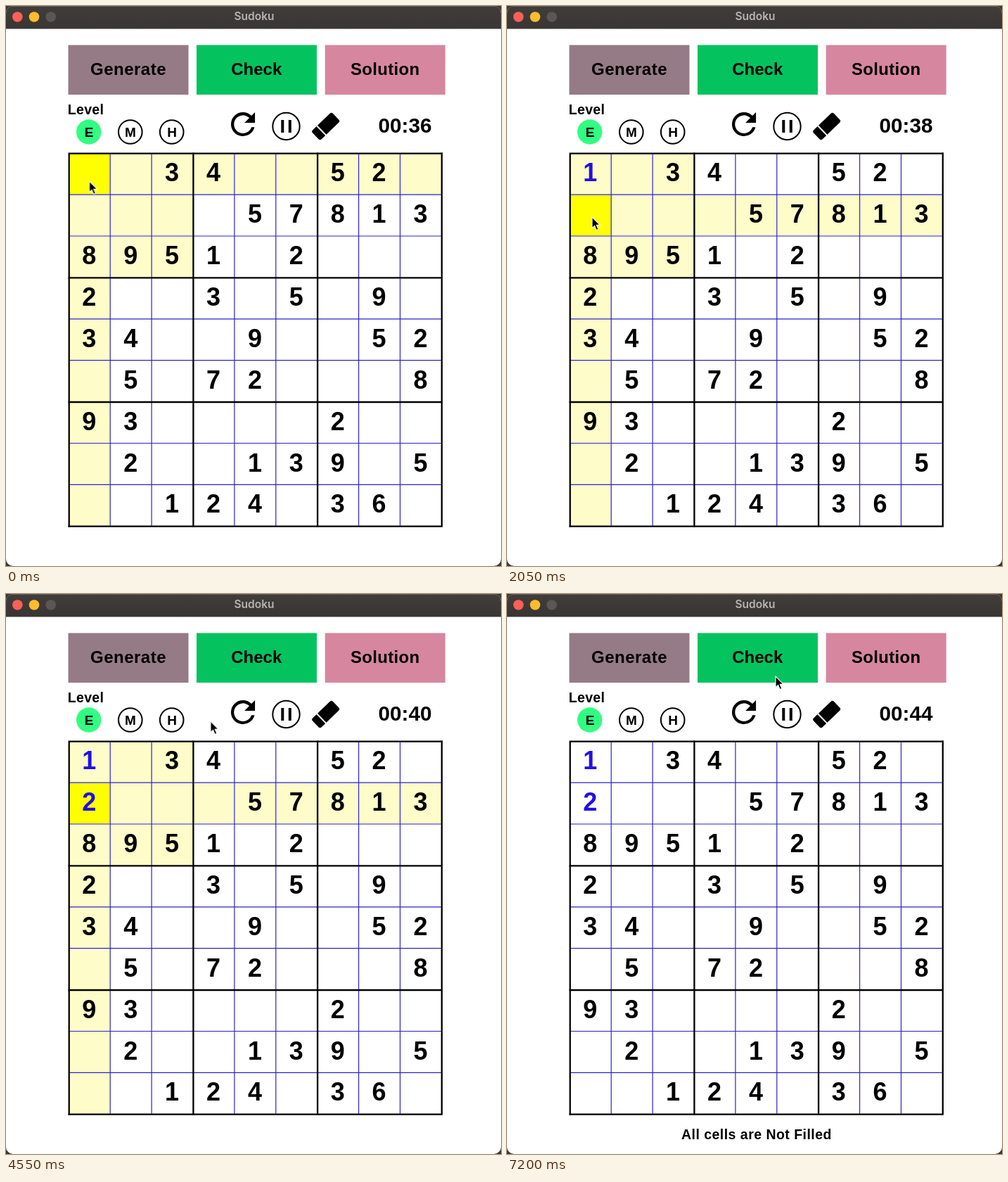
An HTML page for the animation above (8000 ms loop, 704x796 px).

```html
<!DOCTYPE html>
<html lang="en">
<head>
<meta charset="utf-8">
<title>Sudoku</title>
<style>
  html, body { margin: 0; width: 100%; height: 100%; overflow: hidden; background: #3b372f; }
  svg { display: block; width: 704px; height: 796px; }
  text { font-family: "Liberation Sans", Arial, sans-serif; font-weight: 700; white-space: pre; }
  .mid { text-anchor: middle; }
  .title { font: 600 15.5px Inter, sans-serif; fill: #b7b5b3; }
  .digit { font-size: 36px; }
  .typed { fill: #2310e2; }
  .level { font-size: 19px; }
  .thin { stroke: #2d22c4; stroke-width: 1.2; }
  .thick { stroke: #000; stroke-width: 2.3; stroke-linecap: square; }
  #cursor { animation: move 8s infinite; }
  @keyframes move {
    0%, 8.75% { transform: translate(118.5px, 249px); animation-timing-function: ease-in-out; }
    11.25% { transform: translate(122px, 298px); animation-timing-function: ease-out; }
    15%, 50.625% { transform: translate(121px, 300px); animation-timing-function: ease-in-out; }
    61.25%, 100% { transform: translate(382px, 117px); }
  }
</style>
</head>
<body>
<svg viewBox="0 0 704 796">
  <defs>
    <linearGradient id="bar" x2="0" y2="1">
      <stop offset="0" stop-color="#403d3b"/><stop offset="1" stop-color="#383533"/>
    </linearGradient>
    <clipPath id="win"><rect width="704" height="796" rx="10"/></clipPath>
  </defs>
  <g clip-path="url(#win)">
    <rect width="704" height="796" fill="#fff"/>
    <rect width="704" height="32.5" fill="url(#bar)"/>
    <rect width="704" height="1" fill="#625f5d"/>
  </g>
  <circle cx="16.3" cy="15.5" r="7.3" fill="#fe5f57"/>
  <circle cx="40" cy="15.5" r="7.3" fill="#febc2e"/>
  <circle cx="63.7" cy="15.5" r="7.3" fill="#5a5755"/>
  <text class="title mid" x="353" y="20.3">Sudoku</text>

  <rect x="88.5" y="55.5" width="171" height="70.5" fill="#957b85"/>
  <rect x="271" y="55.5" width="171" height="70.5" fill="#04c35f"/>
  <rect x="453.7" y="55.5" width="171" height="70.5" fill="#d6879f"/>
  <g font-size="24">
    <text x="120" y="98" letter-spacing=".5">Generate</text>
    <text x="320.2" y="98">Check</text>
    <text x="490" y="98" letter-spacing=".3">Solution</text>
  </g>

  <text x="87.8" y="154" font-size="19.5" letter-spacing=".3">Level</text>
  <circle cx="117.7" cy="179" r="17.7" fill="#32fd82"/>
  <g fill="none" stroke="#000" stroke-width="2">
    <circle cx="176.8" cy="179" r="16.8"/>
    <circle cx="235.7" cy="179" r="16.8"/>
    <circle cx="398.5" cy="171" r="19.2"/>
  </g>
  <text class="level mid" x="118" y="186">E</text>
  <text class="level mid" x="177" y="186">M</text>
  <text class="level mid" x="236" y="186">H</text>

  <path transform="translate(311.5 142.5) scale(2.13)" d="M17.65 6.35C16.2 4.9 14.21 4 12 4a8 8 0 1 0 7.73 10h-2.08A6 6 0 1 1 16.22 7.78L13 11h7V4z"/>
  <path d="M391.3 162h4v18h-4zM401.8 162h4v18h-4z"/>
  <g transform="translate(454.7 171) rotate(-44)">
    <rect x="-20" y="-9" width="40" height="18" rx="3"/>
    <path d="M-8.5 -10V10" stroke="#fff" stroke-width="2"/>
  </g>
  <text id="clock" x="529.6" y="179.6" font-size="29.7"></text>

  <g id="shade"></g>
  <g id="lines"></g>
  <g id="digits"></g>
  <text id="note" x="248" y="774.7" font-size="19.5" letter-spacing=".47">All cells are Not Filled</text>

  <g id="cursor">
    <path d="M0 0V15.6L3.6 12.4L6.2 18.6L8.9 17.4L6.3 11.4H11.2Z" fill="#000" stroke="#fff" stroke-width="1.1"/>
  </g>
</svg>
<script>
const LOOP = 8000, LEFT = 89.7, TOP = 209.6, CELL = 58.9;
const PUZZLE = [
  "..34..52.", "....57813", "8951.2...",
  "2..3.5.9.", "34..9..52", ".5.72...8",
  "93....2..", ".2..139.5", "..124.36."
];
// Moments at which the clock gains a second, starting from 00:36
const TICKS = [1000, 2000, 2950, 4000, 5000, 6000, 6150, 7200];
const ONE_AT = 50, PICK_AT = 2050, TWO_AT = 3050, CHECK_AT = 5250;

const byId = id => document.getElementById(id);

function add(parent, tag, attrs, text = "") {
  const el = document.createElementNS("http://www.w3.org/2000/svg", tag);
  for (const k in attrs) el.setAttribute(k, attrs[k]);
  el.textContent = text;
  byId(parent).append(el);
  return el;
}

function addDigit(row, col, value, cls = "") {
  return add("digits", "text", {
    class: "digit mid " + cls,
    x: LEFT + 28.6 + col * CELL,
    y: TOP + 39.6 + row * CELL
  }, value);
}

const cells = [];
for (let r = 0; r < 9; r++) {
  for (let c = 0; c < 9; c++) {
    const rect = add("shade", "rect", {
      x: LEFT + c * CELL + 0.6, y: TOP + r * CELL + 0.6, width: 57.4, height: 57.4
    });
    cells.push({ r, c, rect });
    if (PUZZLE[r][c] !== ".") addDigit(r, c, PUZZLE[r][c]);
  }
}

function addLines(cls, wanted, shift) {
  for (let i = 0; i < 10; i++) {
    if (!wanted(i)) continue;
    const p = i * CELL + shift, size = 9 * CELL;
    add("lines", "path", { class: cls, d: `M${LEFT + p} ${TOP}v${size}M${LEFT} ${TOP + p}h${size}` });
  }
}
addLines("thin", i => i % 3, -0.4);
addLines("thick", i => i % 3 === 0, 0);

const one = addDigit(0, 0, "1", "typed");
const two = addDigit(1, 0, "2", "typed");

function show(el, on) {
  el.style.visibility = on ? "visible" : "hidden";
}

function shadeFor(row) {
  for (const { r, c, rect } of cells) {
    const near = row >= 0 && (r === row || c === 0 || (r < 3 && c < 3));
    const picked = r === row && c === 0;
    rect.setAttribute("fill", picked ? "#ffff00" : near ? "#fefcc8" : "#fff");
  }
}

let start, lastRow;
function draw(now) {
  start ??= now;
  const t = (now - start) % LOOP;
  const row = t < PICK_AT ? 0 : t < CHECK_AT ? 1 : -1;
  if (row !== lastRow) shadeFor(lastRow = row);
  show(one, t >= ONE_AT);
  show(two, t >= TWO_AT);
  show(byId("note"), t >= CHECK_AT);
  byId("clock").textContent = "00:" + (36 + TICKS.filter(x => t >= x).length);
  requestAnimationFrame(draw);
}
requestAnimationFrame(draw);
</script>
</body>
</html>
```
